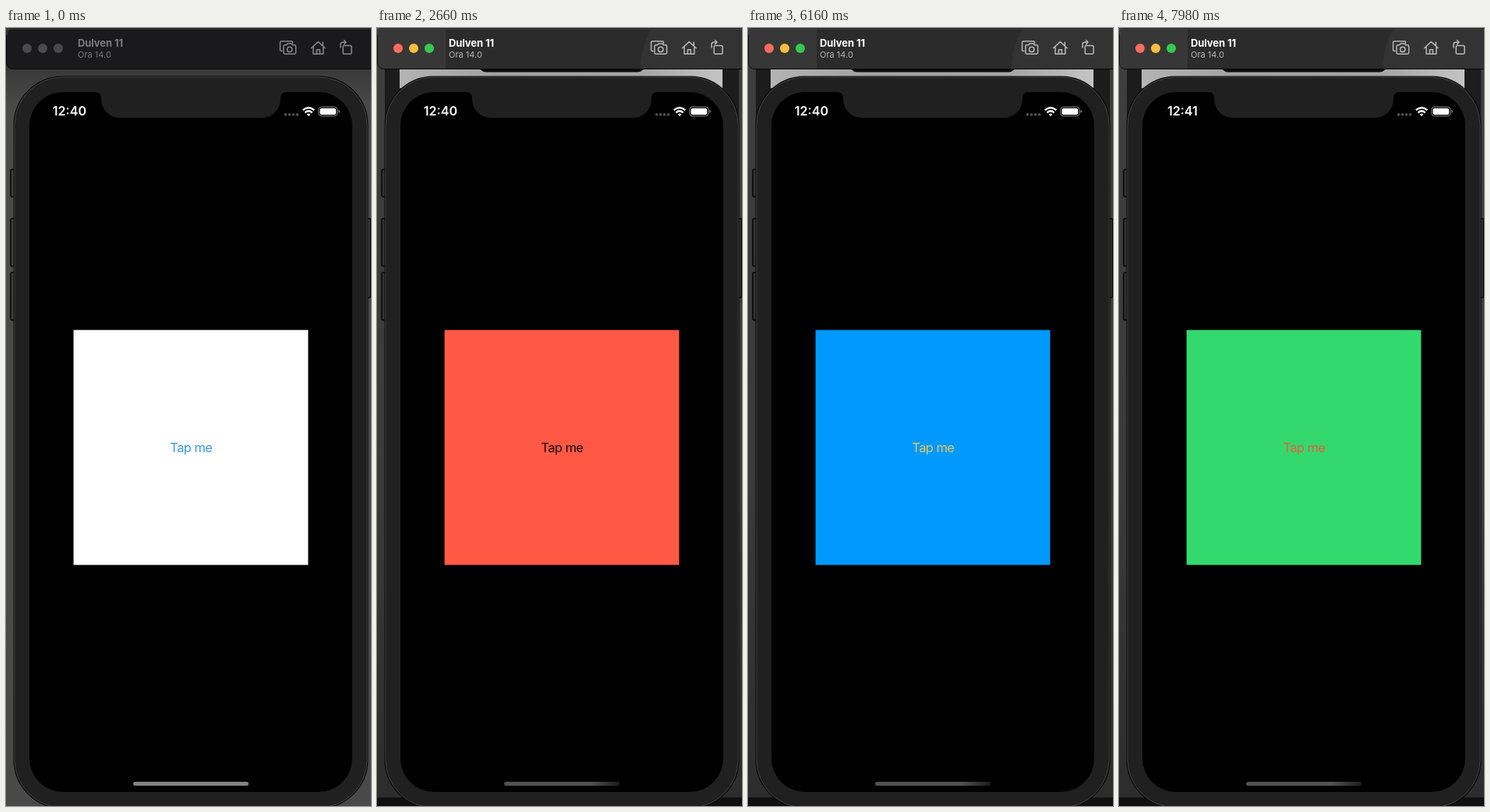
An HTML page for the animation above (8 s loop, 468x996 px).

```html
<!DOCTYPE html>
<html lang="en">
<head>
<meta charset="utf-8">
<title>Action sheet</title>
<style>
  html, body { margin: 0; width: 100%; height: 100%; overflow: hidden; background: #3a3a3a; }
  svg { display: block; width: 100%; height: 100%; }
  text { font-family: Inter, Roboto, sans-serif; }
  .mid { text-anchor: middle; }
  .row { font-size: 20px; letter-spacing: -.8px; fill: #4a9ffb; }
  .icon { fill: none; stroke-width: 1.5; stroke-linejoin: round; stroke-linecap: round; }
  #glow { mix-blend-mode: screen; }
</style>
</head>
<body>
<svg viewBox="0 0 468 996" xmlns="http://www.w3.org/2000/svg">
  <defs>
    <clipPath id="screenClip"><rect x="30" y="82" width="414" height="896" rx="43"/></clipPath>
    <clipPath id="sheetClip"><rect x="38" width="398" height="250" rx="13"/></clipPath>
    <filter id="blur" filterUnits="userSpaceOnUse" x="-60" y="240" width="600" height="600" color-interpolation-filters="sRGB">
      <feGaussianBlur stdDeviation="31"/>
    </filter>
    <linearGradient id="idleBack" x2="0" y2="1">
      <stop offset=".05" stop-color="#383838"/>
      <stop offset=".1" stop-color="#4a4a4a"/>
      <stop offset="1" stop-color="#494949"/>
    </linearGradient>
    <linearGradient id="liveBack" x2="0" y2="1">
      <stop offset="0" stop-color="#3e3e3e"/>
      <stop offset=".6" stop-color="#3a3a3a"/>
      <stop offset="1" stop-color="#2c2c2c"/>
    </linearGradient>
    <linearGradient id="strip">
      <stop offset="0" stop-color="#b4b4b4"/>
      <stop offset=".3" stop-color="#a2a2a2"/>
      <stop offset=".75" stop-color="#a6a6a6"/>
      <stop offset="1" stop-color="#c4c4c4"/>
    </linearGradient>
    <linearGradient id="liveHome">
      <stop offset=".75" stop-color="#525252"/>
      <stop offset="1" stop-color="#1c1c1c"/>
    </linearGradient>
  </defs>

  <!-- desktop -->
  <rect id="back" width="468" height="996"/>
  <g id="behind">
    <rect x="10" y="50" width="454" height="70" fill="#1c1c1c"/>
    <rect x="29" y="40" width="414" height="37" fill="url(#strip)"/>
    <rect x="130" y="36" width="214" height="20.5" rx="10" fill="#0c0c0c"/>
    <rect y="985" width="468" height="11" fill="#101010"/>
  </g>

  <!-- device -->
  <g id="keys" stroke="#080808" stroke-width="1.6"></g>
  <rect x="10.5" y="62.5" width="453" height="936" rx="62" fill="#202020" stroke="#0b0b0b" stroke-width="2"/>
  <rect x="11" y="63" width="452" height="935" rx="61.5" fill="none" stroke="#4b4b4b" stroke-width=".9"/>
  <rect x="30" y="82" width="414" height="896" rx="43"/>

  <g clip-path="url(#screenClip)">
    <rect id="box" x="86.6" y="386.6" width="300.8" height="300.8"/>
    <text id="tap" class="mid" x="237.3" y="543" font-size="16.5" letter-spacing="-.6">Tap me</text>
    <rect id="dim" x="86" y="386" width="302" height="302"/>

    <g id="sheet">
      <g clip-path="url(#sheetClip)">
        <rect x="38" width="398" height="250" fill="#2a2a2a"/>
        <g id="glow" opacity=".37">
          <rect id="glowBox" x="87" y="387" width="300" height="300" filter="url(#blur)"/>
        </g>
        <path d="M38 77.3H436M38 135.1H436M38 192.6H436" stroke="#555" stroke-width="1"/>
      </g>
      <rect x="38" y="258" width="398" height="56.6" rx="13" fill="#3c3c3c"/>
      <g fill="#fff" fill-opacity=".56" font-size="13" letter-spacing="-.12">
        <text class="mid" x="237" y="27.3" font-weight="600">Change Background</text>
        <text class="mid" x="237" y="49.4">Select a new colour</text>
      </g>
      <text class="mid row" x="236.8" y="113.3">Red</text>
      <text class="mid row" x="236.8" y="170.9">Blue</text>
      <text class="mid row" x="236.8" y="228.5">Green</text>
      <text class="mid row" x="236.8" y="293.5" font-weight="600" style="font-size:19.5px">Cancel</text>
    </g>
  </g>
  <rect id="home" x="163" y="965" width="148" height="5" rx="2.5"/>

  <!-- notch and status bar -->
  <path d="M115 81H359V82A7 7 0 0 0 352 89V91A24 24 0 0 1 328 115H146A24 24 0 0 1 122 91V89A7 7 0 0 0 115 82Z" fill="#202020"/>
  <text id="clock" class="mid" x="81.4" y="112.3" font-size="16.1" font-weight="600" fill="#fff"></text>
  <path d="M358.5 110.8H375" stroke="#4c4c4c" stroke-width="3.8" stroke-linecap="round" stroke-dasharray="0 5"/>
  <g fill="none" stroke="#fff" stroke-width="2.4">
    <path d="M380.7 105.2Q388 98.6 395.3 105.2M383.4 108.4Q388 104.2 392.6 108.4"/>
    <path d="M388 113L385.6 110.4Q388 108.4 390.4 110.4Z" fill="#fff" stroke="none"/>
  </g>
  <rect x="400.8" y="101" width="24" height="11.6" rx="3.4" fill="none" stroke="#8a8a8a"/>
  <rect x="402.5" y="102.7" width="20.6" height="8.2" rx="2" fill="#fff"/>
  <path d="M426.3 104.8Q428 105.2 428 106.8T426.3 108.8Z" fill="#8a8a8a"/>

  <!-- toolbar -->
  <rect id="bar" x=".5" y=".5" width="474" height="52" rx="8" stroke="#0a0a0a"/>
  <g id="tint">
    <path d="M1 9Q1 1 9 1H88V52H9Q1 52 1 44Z" fill="#373737"/>
    <path d="M352 1H468V52H338Q338 24 352 1Z" fill="#333"/>
  </g>
  <path d="M1 9Q1 1 9 1H468" fill="none" stroke="#505050" stroke-width=".8"/>
  <g id="lights"></g>
  <text id="title" x="92" y="24" font-size="13" font-weight="700" letter-spacing="-.1">Dulven 11</text>
  <text id="subtitle" x="92" y="38" font-size="11">Ora 14.0</text>
  <g id="icons" class="icon">
    <path d="M354 29.5H353Q351.5 29.5 351.5 28V18.5Q351.5 17 353 17H366Q367.5 17 367.5 18.5V19.5"/>
    <path d="M357.5 21.8H359.6L361 20H366L367.4 21.8H370Q371.6 21.8 371.6 23.4V31.6Q371.6 33.2 370 33.2H357.5Q355.9 33.2 355.9 31.6V23.4Q355.9 21.8 357.5 21.8Z"/>
    <circle cx="363.7" cy="27.4" r="3.2"/>
    <path d="M391.5 25.8L400.3 17.6L409.2 25.8M394 24.5V33.3H406.8V24.5M406.3 22.4V18.2M398.4 33V27.8H402.4V33"/>
    <rect x="432.2" y="22.5" width="10.8" height="10.8" rx="1.5"/>
    <path d="M429 25V21Q429 18.3 432 18.3H435.5M433.5 15.8L436 18.3L433.5 20.8"/>
  </g>
</svg>
<script>
const LOOP = 8000, STEP = 70;
const ACTIVE_AT = 420, MINUTE_AT = 7000;
const REST_Y = 628.8, TRAVEL = 349, OMEGA = 18.26 / 1000;

// sheet moves: start time, 1 = up, 0 = down
const moves = [[700, 1], [2097, 0], [3781.6, 1], [4823, 0], [6160, 1], [7277, 0]];

const looks = [
  { at: 0, box: '#ffffff', tap: '#3a98e2' },
  { at: 2520, box: '#ff5946', tap: '#160606' },
  { at: 5250, box: '#0099ff', tap: '#eac65a' },
  { at: 7700, box: '#33d96e', tap: '#e2603c' }
];

const idle = { back: 'url(#idleBack)', bar: '#1a1a1d', title: '#7c7c7e', subtitle: '#77777a',
  icon: '#88888a', home: '#838383', key: '#3f3f3f', lights: ['#4a4a4c', '#4a4a4c', '#4a4a4c'] };
const live = { back: 'url(#liveBack)', bar: '#2b2b2b', title: '#ffffff', subtitle: '#b4b4b4',
  icon: '#b8b8b8', home: 'url(#liveHome)', key: '#333333', lights: ['#ff6b5f', '#fdbd3e', '#34c84f'] };

const $ = id => document.getElementById(id);
const set = (el, attrs) => { for (const k in attrs) el.setAttribute(k, attrs[k]); };

function add(parent, tag, attrs) {
  const el = document.createElementNS('http://www.w3.org/2000/svg', tag);
  set(el, attrs);
  return parent.appendChild(el);
}

const lights = [27, 47, 67].map(cx => add($('lights'), 'circle', { cx, cy: 26, r: 6 }));
[[6, 181, 35], [6, 244, 61], [6, 313, 61], [458, 244, 101]].forEach(([x, y, height]) =>
  add($('keys'), 'rect', { x, y, width: 9.5, height, rx: 2 }));

// critically damped spring from 0 to 1
const spring = ms => 1 - (1 + OMEGA * ms) * Math.exp(-OMEGA * ms);
const latest = (list, test) => list.filter(test).pop();

function sheetLevel(t) {
  const move = latest(moves, m => m[0] <= t);
  if (!move) return 0;
  const p = spring(t - move[0]);
  return move[1] ? p : 1 - p;
}

function drawWindow(t) {
  const on = t >= ACTIVE_AT, c = on ? live : idle;
  const shown = on ? 'inline' : 'none';
  set($('behind'), { display: shown });
  set($('tint'), { display: shown });
  for (const id of ['back', 'bar', 'title', 'subtitle', 'home']) set($(id), { fill: c[id] });
  set($('icons'), { stroke: c.icon });
  set($('keys'), { fill: c.key });
  lights.forEach((el, i) => set(el, { fill: c.lights[i] }));
}

function drawScreen(t) {
  const look = latest(looks, l => l.at <= t);
  const level = sheetLevel(t), shade = 0.4 * level;
  const y = REST_Y + TRAVEL * (1 - level);
  set($('box'), { fill: look.box });
  set($('tap'), { fill: look.tap });
  set($('dim'), { opacity: shade });
  set($('sheet'), { transform: `translate(0 ${y})`, display: level > 0.0005 ? 'inline' : 'none' });
  set($('glow'), { transform: `translate(0 ${-y})` });
  set($('glowBox'), { fill: look.box, 'fill-opacity': 1 - shade });
  $('clock').textContent = t < MINUTE_AT ? '12:40' : '12:41';
}

function draw(now) {
  const t = Math.floor((now % LOOP) / STEP) * STEP;
  drawWindow(t);
  drawScreen(t);
}

let start;
function tick(now) {
  start ??= now;
  draw(now - start);
  requestAnimationFrame(tick);
}
draw(0);
requestAnimationFrame(tick);
</script>
</body>
</html>
```
